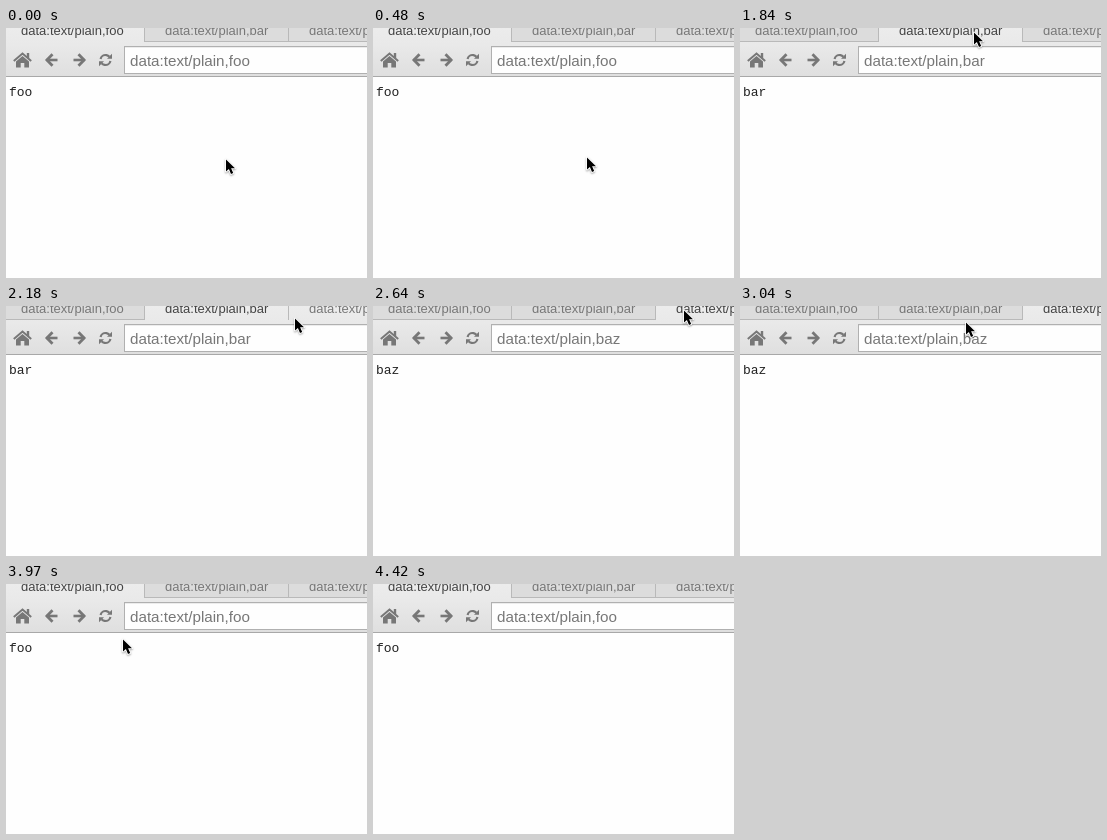
Recreate the animation shown at these times as an HTML page with a canvas. Size 361 px wide and 250 px high, loop 4630 ms.

```html
<!DOCTYPE html>
<html lang="en">
<head>
<meta charset="utf-8">
<title>Browser tabs</title>
<style>
  html, body { margin: 0; width: 100%; height: 100%; overflow: hidden; background: #fefefe; }
  canvas { display: block; }
</style>
</head>
<body>
<canvas id="stage" width="361" height="250"></canvas>
<script>
const ctx = document.getElementById('stage').getContext('2d');
const W = 361, H = 250, LOOP = 4630;
const SANS = '"Liberation Sans", Arial, sans-serif';
const MONO = '"Liberation Mono", "Courier New", monospace';
const GRAY = '#777';
const words = ['foo', 'bar', 'baz'];
const edges = [0, 139, 283, 427];

// Visible address label, drawn as text only.
const scheme = 'data', type = 'text/plain';
const address = word => `${scheme}:${type},${word}`;

const smooth = u => u * u * (3 - 2 * u);
const easeOut = p => u => 1 - Math.pow(1 - u, p);
const linear = u => u;

// Pointer moves: each runs from the previous end along a quadratic curve.
const origin = [219, 130];
const moves = [
  { start: 60, end: 300, steps: 4, via: [206, 130], to: [215, 129], ease: linear },
  { start: 480, end: 480, steps: 1, via: [214, 128], to: [213, 128], ease: linear },
  { start: 840, end: 1360, steps: 10, via: [224, 64], to: [230, 1], ease: easeOut(2.12) },
  { start: 1840, end: 2350, steps: 9, via: [269, 25], to: [308, 3], ease: smooth },
  { start: 2410, end: 2410, steps: 1, via: [309, 3], to: [310, 3], ease: linear },
  { start: 2820, end: 3320, steps: 9, via: [208, 25], to: [107, 13], ease: smooth },
  { start: 3380, end: 3550, steps: 4, via: [95, 8], to: [86, 4], ease: easeOut(1.5) },
  { start: 3970, end: 4420, steps: 9, via: [201, 202], to: [324, 254], ease: easeOut(1.2) }
];

function pointerAt(t) {
  let from = origin;
  for (const m of moves) {
    if (t < m.start) break;
    const gap = (m.end - m.start) / (m.steps - 1) || 1;
    const done = Math.min(m.steps, Math.floor((t - m.start) / gap + 0.02) + 1);
    if (done === m.steps) { from = m.to; continue; }
    const e = m.ease(done / m.steps), r = 1 - e;
    return from.map((a, i) => Math.round(r * r * a + 2 * r * e * m.via[i] + e * e * m.to[i]));
  }
  return from;
}

function rect(x, y, w, h, color) {
  ctx.fillStyle = color;
  ctx.fillRect(x, y, w, h);
}

function text(str, x, y, size, family, color) {
  ctx.font = size + 'px ' + family;
  ctx.fillStyle = color;
  ctx.fillText(str, x, y);
}

function trace(points) {
  ctx.beginPath();
  points.forEach(([x, y]) => ctx.lineTo(x, y));
}

function polygon(points, color) {
  trace(points);
  ctx.closePath();
  ctx.fillStyle = color;
  ctx.fill();
}

function line(points, width, color) {
  trace(points);
  ctx.lineWidth = width;
  ctx.strokeStyle = color;
  ctx.stroke();
}

function drawTabs(active, hovered) {
  words.forEach((word, i) => {
    const x = edges[i], w = edges[i + 1] - x - 1;
    if (i !== active && i !== hovered) {
      rect(x, 0, w, 13, '#dcdcdc');
      rect(x, 13, w, 1, '#b9b9b9');
    }
    if (i) rect(x - 1, 0, 1, 14, '#b9b9b9');
    text(address(word), 15 + 144 * i, 7, 13, SANS, i === active ? '#444' : GRAY);
  });
}

function drawHome() {
  line([[7.8, 33], [16.5, 25.6], [25.2, 33]], 2, GRAY);
  rect(20.8, 25, 2.4, 5, GRAY);
  polygon([[10, 33.4], [16.5, 28], [23, 33.4], [23, 39.5], [18.3, 39.5],
    [18.3, 35], [14.7, 35], [14.7, 39.5], [10, 39.5]], GRAY);
}

function drawArrow(x, dir) {
  line([[x + dir, 32], [x + 12 * dir, 32]], 2.6, GRAY);
  line([[x + 7 * dir, 26.2], [x + 1.4 * dir, 32], [x + 7 * dir, 37.8]], 2.8, GRAY);
}

function drawReload() {
  ctx.save();
  ctx.translate(99.5, 32);
  for (let i = 0; i < 2; i++) {
    ctx.beginPath();
    ctx.arc(0, 0, 5, Math.PI * 1.06, Math.PI * 1.78);
    ctx.lineWidth = 2.2;
    ctx.strokeStyle = GRAY;
    ctx.stroke();
    polygon([[6.5, -6.2], [6.5, -1.2], [1.5, -1.2]], GRAY);
    ctx.rotate(Math.PI);
  }
  ctx.restore();
}

function drawToolbar(word) {
  drawHome();
  drawArrow(39.5, 1);
  drawArrow(79.5, -1);
  drawReload();
  rect(118, 18, W - 118, 28, '#b0b0b0');
  rect(119, 19, W - 119, 26, '#fefefe');
  rect(119, 19, W - 119, 1, '#ececec');
  text(address(word), 124, 38, 15.2, SANS, GRAY);
}

function drawBeam() {
  ctx.beginPath();
  for (const s of [-1, 1]) {
    ctx.moveTo(-2.5, s * 7);
    ctx.quadraticCurveTo(0.5, s * 7, 0.5, s * 5);
    ctx.quadraticCurveTo(0.5, s * 7, 3.5, s * 7);
  }
  ctx.moveTo(0.5, -5.5);
  ctx.lineTo(0.5, 5.5);
  ctx.moveTo(-1.5, 3);
  ctx.lineTo(2.5, 3);
  ctx.lineWidth = 2.2;
  ctx.strokeStyle = 'rgba(255,255,255,.6)';
  ctx.stroke();
  ctx.lineWidth = 1.2;
  ctx.strokeStyle = '#111';
  ctx.stroke();
}

function drawPointer(x, y) {
  ctx.save();
  ctx.translate(x, y);
  ctx.lineJoin = 'round';
  if (x >= 118 && y >= 17 && y < 45) {
    ctx.translate(1, 0);
    drawBeam();
  } else {
    const arrow = [[1, 1.4], [1, 13.6], [3.9, 11], [6, 16], [8.2, 15], [6.1, 10.3], [10, 10.2]];
    ctx.save();
    ctx.shadowColor = 'rgba(0,0,0,.35)';
    ctx.shadowBlur = 2;
    ctx.shadowOffsetY = 1;
    trace(arrow);
    ctx.closePath();
    ctx.lineWidth = 1.8;
    ctx.strokeStyle = '#fff';
    ctx.stroke();
    ctx.restore();
    polygon(arrow, '#000');
  }
  ctx.restore();
}

function draw(t) {
  const active = t < 1540 ? 0 : t < 2640 ? 1 : t < 3730 ? 2 : 0;
  const page = t >= 1540 && t < 1600 ? 0 : active;
  const [x, y] = pointerAt(t);
  const hovered = y <= 13 ? edges.findIndex((e, i) => x >= e && x < edges[i + 1]) : -1;

  rect(0, 0, W, H, '#fefefe');
  const shade = ctx.createLinearGradient(0, 0, 0, 48);
  shade.addColorStop(0, '#ececec');
  shade.addColorStop(0.35, '#e9e9e9');
  shade.addColorStop(1, '#dfdfdf');
  rect(0, 0, W, 48, shade);
  rect(0, 48, W, 1, '#a8a8a8');

  drawTabs(active, hovered);
  drawToolbar(words[page]);
  text(words[page], 3, 68, 13, MONO, '#222');
  if (y < H) drawPointer(x, y);
}

const began = performance.now();
function tick() {
  draw((performance.now() - began) % LOOP);
  requestAnimationFrame(tick);
}
tick();
</script>
</body>
</html>
```
